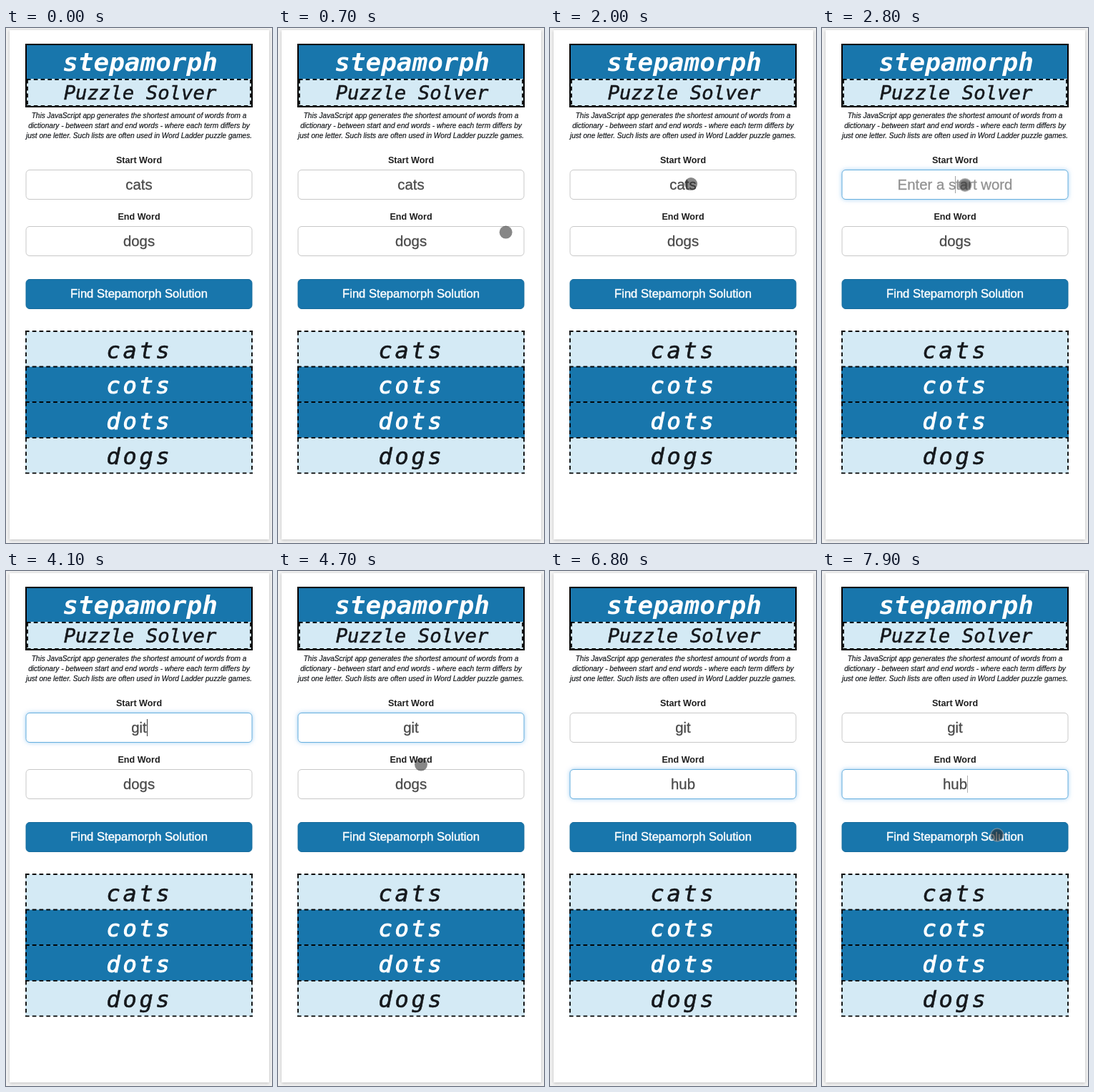
An HTML page with a canvas for the animation above (8 s loop, 372 by 720 pixels).

```html
<!DOCTYPE html>
<html lang="en">
<head>
<meta charset="utf-8">
<title>Word ladder solver</title>
<style>
  html, body { margin: 0; width: 100%; height: 100%; overflow: hidden; background: #f1f1f1; }
  canvas { display: block; width: 372px; height: 720px; }
</style>
</head>
<body>
<canvas id="stage"></canvas>
<script>
const W = 372, H = 720, LOOP = 8000, MID = 186;
const LEFT = 27, WIDTH = 318, RIGHT = LEFT + WIDTH;
const BLUE = '#1876ac', PALE = '#d4eaf5', INK = '#15181c';
const SANS = '"Liberation Sans", Arial, sans-serif';
const MONO = '"DejaVu Sans Mono", monospace';

const canvas = document.getElementById('stage');
const ctx = canvas.getContext('2d');
const ratio = window.devicePixelRatio || 1;
canvas.width = W * ratio;
canvas.height = H * ratio;

const clamp = v => Math.max(0, Math.min(1, v));
const ramp = (t, from, to) => clamp((t - from) / (to - from));
const ease = p => p * p * (3 - 2 * p);
const lerp = (a, b, p) => a + (b - a) * p;

function box(x, y, w, h, fill) {
  ctx.fillStyle = fill;
  ctx.fillRect(x, y, w, h);
}

// A thin outline of the same colour gives the slightly heavier letters.
function text(str, y, font, color, { x = MID, weight = 0.3, spacing = 0 } = {}) {
  ctx.font = font;
  ctx.fillStyle = ctx.strokeStyle = color;
  ctx.lineWidth = weight;
  ctx.textAlign = 'center';
  ctx.letterSpacing = spacing + 'px';
  ctx.fillText(str, x, y);
  if (weight) ctx.strokeText(str, x, y);
  ctx.letterSpacing = '0px';
}

function panel(x, y, w, h, fill, stroke) {
  ctx.beginPath();
  ctx.roundRect(x, y, w, h, 5);
  ctx.fillStyle = fill;
  ctx.fill();
  ctx.shadowColor = 'transparent';
  ctx.lineWidth = 1;
  ctx.strokeStyle = stroke;
  ctx.stroke();
}

function dash(x1, y1, x2, y2) {
  ctx.setLineDash([5.6, 4.2]);
  ctx.lineWidth = 1.8;
  ctx.strokeStyle = '#000';
  ctx.beginPath();
  ctx.moveTo(x1, y1);
  ctx.lineTo(x2, y2);
  ctx.stroke();
  ctx.setLineDash([]);
}

function dashedBox(x, y, w, h) {
  dash(x, y, x + w, y);
  dash(x, y + h, x + w, y + h);
  dash(x + 1, y, x + 1, y + h);
  dash(x + w - 1, y, x + w - 1, y + h);
}

function drawPage() {
  box(0, 0, W, H, '#f1f1f1');
  ctx.save();
  ctx.shadowColor = 'rgba(0,0,0,.22)';
  ctx.shadowBlur = 4 * ratio;
  ctx.shadowOffsetY = ratio;
  box(5, 3, 363, 712, '#fff');
  ctx.restore();
}

function drawHeader() {
  box(LEFT, 22, WIDTH, 89, '#000');
  box(LEFT + 2, 24, WIDTH - 4, 48, BLUE);
  box(LEFT + 2, 71, WIDTH - 4, 38, PALE);
  dashedBox(LEFT + 2, 72, WIDTH - 4, 37);
  text('stepamorph', 60, `italic bold 36px ${MONO}`, '#fff', { x: MID + 1.5, weight: 0 });
  text('Puzzle Solver', 100, `italic 27.3px ${MONO}`, INK, { x: MID + 1.5, weight: 0.5 });
  const lines = [
    'This JavaScript app generates the shortest amount of words from a',
    'dictionary - between start and end words - where each term differs by',
    'just one letter. Such lists are often used in Word Ladder puzzle games.'
  ];
  lines.forEach((s, i) => text(s, 126 + i * 13.8, `italic 10.1px ${SANS}`, INK, { weight: 0.2 }));
}

const fields = [
  { label: 'Start Word', y: 198, old: 'cats', word: 'git', hint: 'Enter a start word',
    focus: 2300, type: 3100, blur: 5000 },
  { label: 'End Word', y: 277, old: 'dogs', word: 'hub', hint: 'Enter an end word',
    focus: 5000, type: 6100, blur: LOOP + 1000 }
];
const KEY_GAP = 100;

// The blink restarts whenever the field gains focus or a key is hit.
function caretAlpha(t, f) {
  if (t < f.focus || t >= f.blur) return 0;
  const lastKey = f.type + (f.word.length - 1) * KEY_GAP;
  const origin = t < f.type ? f.focus + 100 : Math.min(t, lastKey);
  const phase = Math.max(0, t - origin) % 860;
  return 1 - ramp(phase, 280, 480) + ramp(phase, 700, 820);
}

function drawField(t, f) {
  const { y } = f;
  const typed = f.word.slice(0, Math.max(0, Math.floor((t - f.type) / KEY_GAP) + 1));
  const value = t < f.focus ? f.old : typed;
  const glow = ramp(t, f.focus, f.focus + 150) - ramp(t, f.blur, f.blur + 150);
  const edge = [102, 175, 222].map(c => lerp(200, c, glow));

  text(f.label, y - 9.5, `bold 12.6px ${SANS}`, '#1f1f1f', { weight: 0 });
  ctx.save();
  ctx.shadowColor = `rgba(102,175,233,${0.7 * glow})`;
  ctx.shadowBlur = 6 * ratio;
  panel(LEFT + 1, y + 0.5, WIDTH - 2, 41, '#fff', `rgb(${edge})`);
  ctx.restore();

  text(value || f.hint, y + 28, `20.4px ${SANS}`, value ? '#4a4a4a' : '#929292');
  const x = MID + (value ? ctx.measureText(value).width / 2 : 0);
  box(Math.round(x), y + 9, 1, 24, `rgba(20,20,20,${caretAlpha(t, f)})`);
}

function drawButton() {
  panel(LEFT + 1, 351.5, WIDTH - 2, 41, BLUE, '#156a9b');
  text('Find Stepamorph Solution', 377, `16.6px ${SANS}`, '#fff', { weight: 0.4 });
}

function drawLadder() {
  const top = 424, step = 49.6;
  ['cats', 'cots', 'dots', 'dogs'].forEach((word, i) => {
    const y = top + i * step, inner = i % 3 > 0;
    box(LEFT, y, WIDTH, step, inner ? BLUE : PALE);
    dashedBox(LEFT, y, WIDTH, step);
    text(word, y + 37.5, `italic 32px ${MONO}`, inner ? '#fff' : INK,
      { weight: inner ? 1.1 : 0.6, spacing: 3.7, x: MID + 0.5 });
  });
}

// Each leg eases to a point; those with a press fade away afterwards.
const entry = { x: 382, y: 320 };
const legs = [
  { go: 300, stop: 1400, x: 172, y: 206 },
  { go: 1600, stop: 2100, x: 200, y: 219.5, press: 2300, leave: 2800 },
  { go: 4400, stop: 4900, x: 200, y: 298, press: 5000, leave: 5300 },
  { go: 7000, stop: 7500, x: 245, y: 369, press: 7600, leave: LOOP }
];

function drawPointer(t) {
  const i = legs.findLastIndex(leg => t >= leg.go);
  if (i < 0) return;
  const leg = legs[i], from = legs[i - 1] || entry;
  const p = ease(ramp(t, leg.go, leg.stop));
  const x = lerp(from.x, leg.x, p), y = lerp(from.y, leg.y, p);
  const press = leg.press ? ramp(t, leg.press - 100, leg.press) : 0;

  ctx.save();
  ctx.globalAlpha = leg.leave ? 1 - ramp(t, leg.leave, leg.leave + 250) : 1;
  const fill = ctx.createRadialGradient(x, y, 0, x, y, 9);
  fill.addColorStop(0.4, `rgba(40,40,40,${lerp(0.56, 0.68, press)})`);
  fill.addColorStop(1, `rgba(40,40,40,${lerp(0.56, 0.5, press)})`);
  ctx.beginPath();
  ctx.arc(x, y, 9, 0, Math.PI * 2);
  ctx.fillStyle = fill;
  ctx.fill();
  ctx.lineWidth = 1.4;
  ctx.strokeStyle = `rgba(165,165,165,${0.6 * press})`;
  ctx.stroke();
  ctx.restore();
}

function draw(t) {
  ctx.setTransform(ratio, 0, 0, ratio, 0, 0);
  drawPage();
  drawHeader();
  fields.forEach(f => drawField(t, f));
  drawButton();
  drawLadder();
  drawPointer(t);
}

function tick() {
  draw(performance.now() % LOOP);
  requestAnimationFrame(tick);
}
tick();
</script>
</body>
</html>
```
